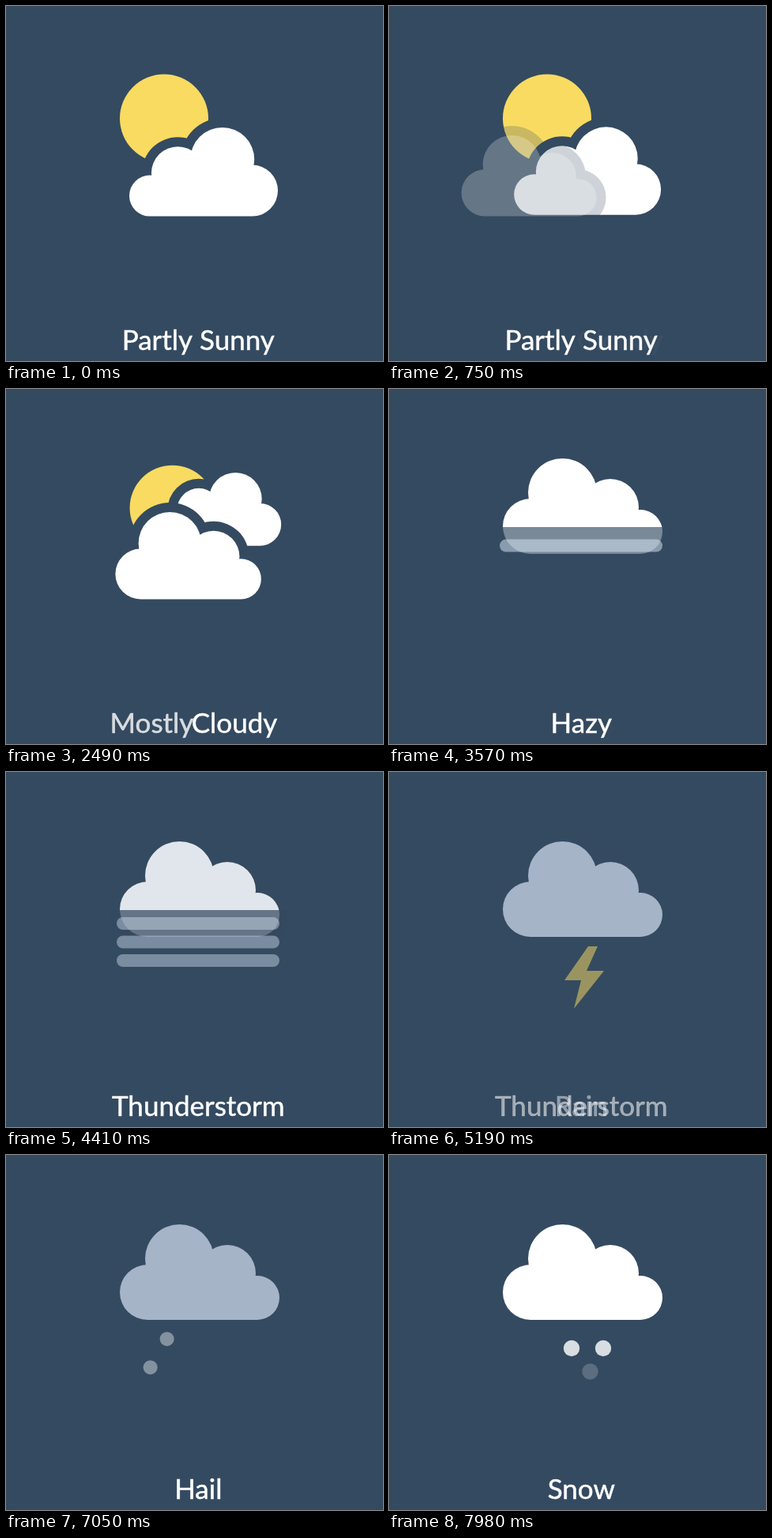
Recreate the animation shown at these times as an HTML page with a canvas. Size 477 px wide and 450 px high, loop 8 s.

```html
<!DOCTYPE html>
<html lang="en">
<head>
<meta charset="utf-8">
<title>Weather icons</title>
<style>
html, body { margin: 0; width: 100%; height: 100%; overflow: hidden; background: #344a60; }
canvas { display: block; }
</style>
</head>
<body>
<canvas id="stage" width="477" height="450"></canvas>
<script>
const ctx = document.getElementById('stage').getContext('2d');
const BG = '#344a60', YELLOW = '#f9db61', BLUE = '#6bb8ea', HAZE = '#d4e4f4', GAP = 12;

const clamp = v => Math.min(1, Math.max(0, v));
const span = (t, start, length) => clamp((t - start) / length);
const ease = p => p < .5 ? 4 * p ** 3 : 1 - 4 * (1 - p) ** 3;
const spring = p => ease(p) + (p > .5 ? .1 * Math.sin(2 * Math.PI * (p - .5)) : 0);
const mix = (a, b, p) => a.map((v, i) => v + (b[i] - v) * p);
// Fades in from start, out again from end
const pulse = (t, start, end, length) => span(t, start, length) * (1 - span(t, end, length));

// Value of a list of poses; each move is [start, length, pose]
function track(t, first, moves) {
  return moves.reduce((pose, [start, length, to]) =>
    mix(pose, to, spring(span(t, start, length))), first);
}

function withAlpha(alpha, draw) {
  if (alpha <= 0) return;
  ctx.save();
  ctx.globalAlpha = alpha;
  draw();
  ctx.restore();
}

function cloudPath(grow) {
  const path = new Path2D();
  for (const [x, y, r] of [[75.5, 43.5, 43.5], [136, 62, 36], [35, 86, 35], [174, 93, 28]]) {
    path.moveTo(x + r + grow, y);
    path.arc(x, y, r + grow, 0, 7);
  }
  path.rect(35, 80, 139, 41 + grow);
  path.rect(60, 60, 90, 40);
  return path;
}

function cloud([x, y, w], color, flip) {
  const k = w / 202;
  ctx.save();
  ctx.translate(flip ? x + w : x, y);
  ctx.scale(flip ? -k : k, k);
  ctx.fillStyle = BG;
  ctx.fill(cloudPath(GAP / k));
  ctx.fillStyle = color;
  ctx.fill(cloudPath(0));
  ctx.restore();
}

function disc(x, y, r, color) {
  ctx.fillStyle = color;
  ctx.beginPath();
  ctx.arc(x, y, r, 0, 7);
  ctx.fill();
}

function line(x1, y1, x2, y2, width, color) {
  ctx.strokeStyle = color;
  ctx.lineWidth = width;
  ctx.lineCap = 'round';
  ctx.beginPath();
  ctx.moveTo(x1, y1);
  ctx.lineTo(x2, y2);
  ctx.stroke();
}

function drawSky(t) {
  if (t < 2850) {
    const [x, y, r] = track(t, [200, 142.5, 56], [[2280, 570, [252, 183, 46]]]);
    disc(x, y, r, YELLOW);
  }
  if (t < 3500) {
    const pose = track(t, [156, 154, 188], [
      [630, 600, [223, 134, 125]],
      [1500, 330, [199, 113, 149]],
      [2280, 570, [171, 78, 178]],
      [3120, 380, [170, 105, 150]]
    ]);
    withAlpha(1 - span(t, 3220, 280), () => cloud(pose, '#fff', true));
  }
  const pose = track(t, [90, 164, 171], [
    [630, 600, [138, 164, 171]],
    [1500, 330, [138.5, 157.5, 181.5]],
    [2280, 570, [138, 150, 196]],
    [3120, 380, [144, 88, 202]]
  ]);
  const grey = span(t, 4200, 630) * (1 - span(t, 7440, 400));
  const color = `rgb(${mix([255, 255, 255], [165, 180, 199], grey).map(Math.round)})`;
  const base = 1 - span(t, 3420, 230) + span(t, 4250, 580);
  const half = (y, h, alpha) => withAlpha(alpha, () => {
    ctx.beginPath();
    ctx.rect(0, y, 477, h);
    ctx.clip();
    cloud(pose, color, false);
  });
  if (base >= 1) withAlpha(span(t, 630, 500), () => cloud(pose, color, false));
  else {
    half(0, 175, 1);
    half(175, 100, base);
  }
}

function drawHaze(t) {
  for (let i = 0; i < 3; i++) {
    const p = span(t, 3470 + i * 125, 150);
    const y = 192 + i * 23.5 + 20 * (1 - p);
    const alpha = .65 * Math.sqrt(p) * (1 - span(t, 4200, 630));
    withAlpha(alpha, () => line(148, y, 338, y, 16, HAZE));
  }
}

function drawBolt(t) {
  withAlpha(pulse(t, 4530, 5070, 250), () => {
    ctx.fillStyle = YELLOW;
    ctx.fill(new Path2D('M252 221L222 264H243L234 300L272 252H250L264 221Z'));
  });
}

// Three slanted lanes; each piece comes in from the upper right and leaves to the lower left
function lanes(t, start, end, step, length, draw) {
  for (let i = 0; i < 3; i++) {
    const enter = span(t, start + i * step, length);
    const leave = span(t, end + (2 - i) * 125, 150);
    withAlpha(enter * (1 - leave), () => {
      const d = 6 * (1 - enter) - 16 * leave;
      ctx.translate(179 + 38 * i + d, 275.5 - d * 1.73);
      draw(i);
    });
  }
}

function drawFall(t) {
  lanes(t, 5250, 5885, 190, 210, () => line(0, 0, 25.5, -44, 16, BLUE));
  lanes(t, 6160, 6630, 80, 160, () => {
    line(14, -24, 25.5, -44, 16, BLUE);
    disc(0, 0, 8.5, '#fff');
  });
  lanes(t, 6980, 7440, 120, 180, () => {
    disc(0, 0, 9, '#fff');
    disc(21, -36, 9, '#fff');
  });
  const snow = (x, y, start) => withAlpha(.95 * span(t, start, 200), () => disc(x, y, 10.2, '#fff'));
  snow(231, 245, 7810);
  snow(271, 245, 7810);
  snow(254.5, 274.5, 7940);
}

const labels = [
  [0, 1, 'Partly Sunny'],
  [630, 600, 'Partly Cloudy'],
  [1500, 330, 'Mostly Cloudy'],
  [2280, 570, 'Cloudy'],
  [3120, 300, 'Hazy'],
  [4200, 200, 'Thunderstorm'],
  [5070, 250, 'Rain'],
  [5930, 200, 'Sleet'],
  [6630, 250, 'Hail'],
  [7440, 250, 'Snow']
];

function layout(text) {
  let x = 243.3 - ctx.measureText(text).width / 2;
  const places = {};
  for (const word of text.split(' ')) {
    places[word] = x;
    x += ctx.measureText(word + ' ').width;
  }
  return places;
}

function drawLabel(t) {
  ctx.font = '35px Lato, "Open Sans", sans-serif';
  ctx.fillStyle = ctx.strokeStyle = '#fff';
  ctx.lineWidth = .5;
  const i = labels.findLastIndex(([start]) => t >= start);
  const [start, length, text] = labels[i];
  const p = i ? ease(span(t, start, length)) : 1;
  const now = layout(text), before = i ? layout(labels[i - 1][2]) : {};
  const put = (word, x, alpha) => withAlpha(alpha, () => {
    ctx.fillText(word, x, 435.5);
    ctx.strokeText(word, x, 435.5);
  });
  for (const word in before) if (!(word in now)) put(word, before[word], 1 - p);
  for (const word in now) {
    if (word in before) put(word, before[word] + (now[word] - before[word]) * p, 1);
    else put(word, now[word], p);
  }
}

function frame() {
  const t = performance.now() % 8000;
  ctx.fillStyle = BG;
  ctx.fillRect(0, 0, 477, 450);
  drawSky(t);
  drawHaze(t);
  drawBolt(t);
  drawFall(t);
  drawLabel(t);
  requestAnimationFrame(frame);
}
frame();
</script>
</body>
</html>
```
